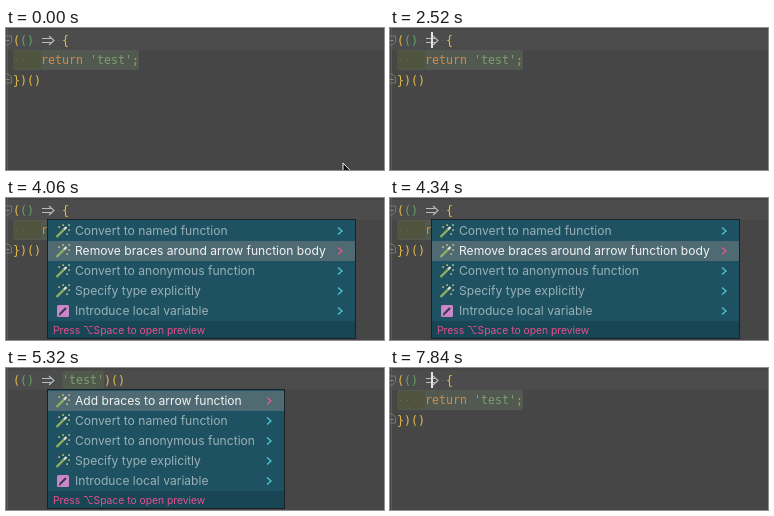
These frames come from a looping animation (378x142 px, 7910 ms). An HTML page with a canvas:

```html
<!DOCTYPE html>
<html lang="en">
<head>
<meta charset="utf-8">
<title>Arrow function braces</title>
<style>
html, body { margin: 0; width: 378px; height: 142px; overflow: hidden; background: #464646; }
canvas { display: block; }
</style>
</head>
<body>
<canvas id="stage" width="378" height="142"></canvas>
<script>
(() => {
const c = document.getElementById('stage').getContext('2d');
const LOOP = 7910, STEP = 70, CH = 7, LEFT = 7, ROW = 20;
const MONO = '11.63px "DejaVu Sans Mono", monospace';
const UI = 'Inter, "DejaVu Sans", sans-serif';
const YELLOW = '#e5bd4c', GREEN = '#62a56a', ORANGE = '#d18b4f',
      STRING = '#7f9f72', PLAIN = '#b7bdc0', FRESH = '#c3c4b2';

const CONVERT = ['Convert to anonymous function', 'Specify type explicitly', 'Introduce local variable'];
const MENU_BLOCK = ['Convert to named function', 'Remove braces around arrow function body', ...CONVERT];
const MENU_INLINE = ['Add braces to arrow function', 'Convert to named function', ...CONVERT];

const colX = i => LEFT + i * CH;
const rowY = line => 2 + line * ROW;
const mix = (a, b, k) => a + (b - a) * k;
const progress = (t, a, b) => Math.min(1, Math.max(0, (t - a) / (b - a)));
const ease = k => k * k * (3 - 2 * k);

function rect(x, y, w, h, fill) {
  c.fillStyle = fill;
  c.fillRect(x, y, w, h);
}

function round(x, y, w, h, r, fill) {
  c.fillStyle = fill;
  c.beginPath();
  c.roundRect(x, y, w, h, r);
  c.fill();
}

function stroke(points, color, width = 1) {
  c.strokeStyle = color;
  c.lineWidth = width;
  c.beginPath();
  points.forEach(([x, y], i) => i ? c.lineTo(x, y) : c.moveTo(x, y));
  c.stroke();
}

function code(str, i, line, color) {
  c.font = MONO;
  c.fillStyle = color;
  [...str].forEach((ch, k) => c.fillText(ch, colX(i + k), rowY(line) + 14));
}

function dots(line, ...cols) {
  cols.forEach(i => rect(colX(i) + 3, rowY(line) + 10, 1, 1, '#686b62'));
}

function arrow() {
  stroke([[36, 10.5], [45.5, 10.5]], PLAIN);
  stroke([[36, 14.5], [45.5, 14.5]], PLAIN);
  stroke([[43, 8], [48, 12.5], [43, 17]], PLAIN, 1.1);
}

function fold(y, dir) {
  stroke([[0, y - 4 * dir], [5.5, y - 4 * dir], [5.5, y + 2 * dir], [2, y + 5 * dir], [0, y + 5 * dir]], '#77776f');
  stroke([[0, y + .5], [3.5, y + .5]], '#8b8b82');
}

function head() {
  code('(', 0, 0, YELLOW);
  code('()', 1, 0, GREEN);
  dots(0, 3, 6);
  arrow();
}

function blockBody(t) {
  const fresh = t >= 6160;
  head();
  code('{', 7, 0, fresh && t < 6440 ? FRESH : YELLOW);
  dots(1, 0, 1, 2, 3, 10);
  code('return', 4, 1, ORANGE);
  code("'test'", 11, 1, STRING);
  code(';', 17, 1, ORANGE);
  code('}', 0, 2, fresh && t < 7000 ? FRESH : YELLOW);
  code(')()', 1, 2, YELLOW);
}

function inlineBody() {
  round(56, 3, 42, 18, 2, '#50594c');
  head();
  code("'test'", 7, 0, STRING);
  code(')()', 13, 0, YELLOW);
}

function wand(y) {
  stroke([[50.5, y + 6], [58, y - 1.5]], '#8fae62', 2.4);
  stroke([[58, y - 1.5], [60.5, y - 4]], '#dfe3cf', 2.4);
  [[53, -4], [57, -6], [63, -1], [61, 3], [63, -6]].forEach(([x, d]) =>
    rect(x - .7, y + d - .7, 1.6, 1.6, '#d3c46a'));
}

function pencil(y) {
  round(51, y - 6, 12, 12, 1.5, '#c987c8');
  stroke([[54, y + 3], [60, y - 3]], '#3c3350', 2);
  rect(53, y + 3, 1.5, 1.5, '#3c3350');
}

function menu(items, selected, width) {
  const inner = width - 2, tip = 41 + width - 14;
  rect(41, 21, width, 120, '#182226');
  rect(42, 22, inner, 118, '#1e5161');
  rect(42, 23 + selected * ROW, inner, ROW, '#4f6a72');
  items.forEach((label, i) => {
    const y = 33 + i * ROW, on = i === selected;
    i === 4 ? pencil(y) : wand(y);
    c.font = '12.1px ' + UI;
    c.fillStyle = on ? '#f1f3f3' : '#9ab0b5';
    c.fillText(label, 69, y + 4.4);
    stroke([[tip - 4, y - 3.5], [tip, y], [tip - 4, y + 3.5]], on ? '#d65c91' : '#4cc3d0', 1.4);
  });
  rect(42, 123, inner, 17, '#184654');
  c.font = '10.3px ' + UI;
  c.fillStyle = '#e5508f';
  c.fillText('Press ⌥Space to open preview', 47, 135.7);
}

function pointer(x, y) {
  c.beginPath();
  [[0, 0], [0, 11], [2.6, 8.6], [4.4, 12.4], [6.2, 11.6], [4.5, 8], [7.6, 7.8]]
    .forEach(([a, b]) => c.lineTo(x + a, y + b));
  c.closePath();
  c.fillStyle = '#111';
  c.fill();
  c.strokeStyle = '#eee';
  c.lineWidth = 1;
  c.stroke();
}

function mouse(t) {
  if (t >= 1260 && t < 7280 || t >= 7420) return;
  if (t >= 7280) return pointer(337, 135);
  const a = ease(progress(t, 0, 350)), b = ease(progress(t, 770, 1120));
  pointer(mix(mix(337, 120, a), 78, b), mix(mix(135, 87, a), 46, b));
}

// Caret as [column, line], or null while hidden.
function caretAt(t) {
  if (t < 1260) return null;
  if (t < 1680) return [1, 1];
  if (t < 1750) return [1, 0];
  if (t < 1820) return [2, 0];
  if (t < 2030) return [3, 0];
  if (t < 2170) return [4, 0];
  if (t < 2660) return [5, 0];
  if (t < 6090 || t >= 7350 && t < 7840) return null;
  return [5, 0];
}

function highlights(t) {
  const line = t >= 1260 && t < 1680 ? 1 : 0;
  rect(2, rowY(line), 376, ROW, '#4c4c4c');
  if (t >= 5320 && t < 6160) return;
  if (t >= 6160 && t < 6650) {
    c.globalAlpha = 1 - progress(t, 6370, 6650);
    rect(56, 2, 322, ROW, '#525b50');
    rect(LEFT, 22, 371, ROW, '#525b50');
    rect(LEFT, 42, CH, ROW, '#5a6056');
    c.globalAlpha = 1;
  } else if (t < 1120 || t >= 2520) {
    round(LEFT, 22, 126, ROW, 2, '#525950');
    rect(LEFT, 23, 28, 18, '#50543f');
  } else {
    rect(LEFT, 22, 28, ROW, '#51523f');
  }
}

function draw(t) {
  const single = t >= 5320 && t < 6160;
  rect(0, 0, 378, 142, '#464646');
  highlights(t);
  rect(1, 0, 1, 142, '#5b5b5b');
  if (t < 5320 || t >= 6440) {
    fold(12, 1);
    fold(51, -1);
  }
  single ? inlineBody() : blockBody(t);
  const caret = caretAt(t);
  if (caret) rect(colX(caret[0]) - 1, rowY(caret[1]) + 2, 2, 16, '#e4e4e4');
  if (t >= 2660 && t < 5320) menu(MENU_BLOCK, t < 4060 ? 0 : 1, 309);
  if (t >= 5320 && t < 6090) menu(MENU_INLINE, 0, 238);
  mouse(t);
}

const start = performance.now();
function tick() {
  const t = (performance.now() - start) % LOOP;
  draw(Math.floor(t / STEP) * STEP);
  requestAnimationFrame(tick);
}
tick();
})();
</script>
</body>
</html>
```
